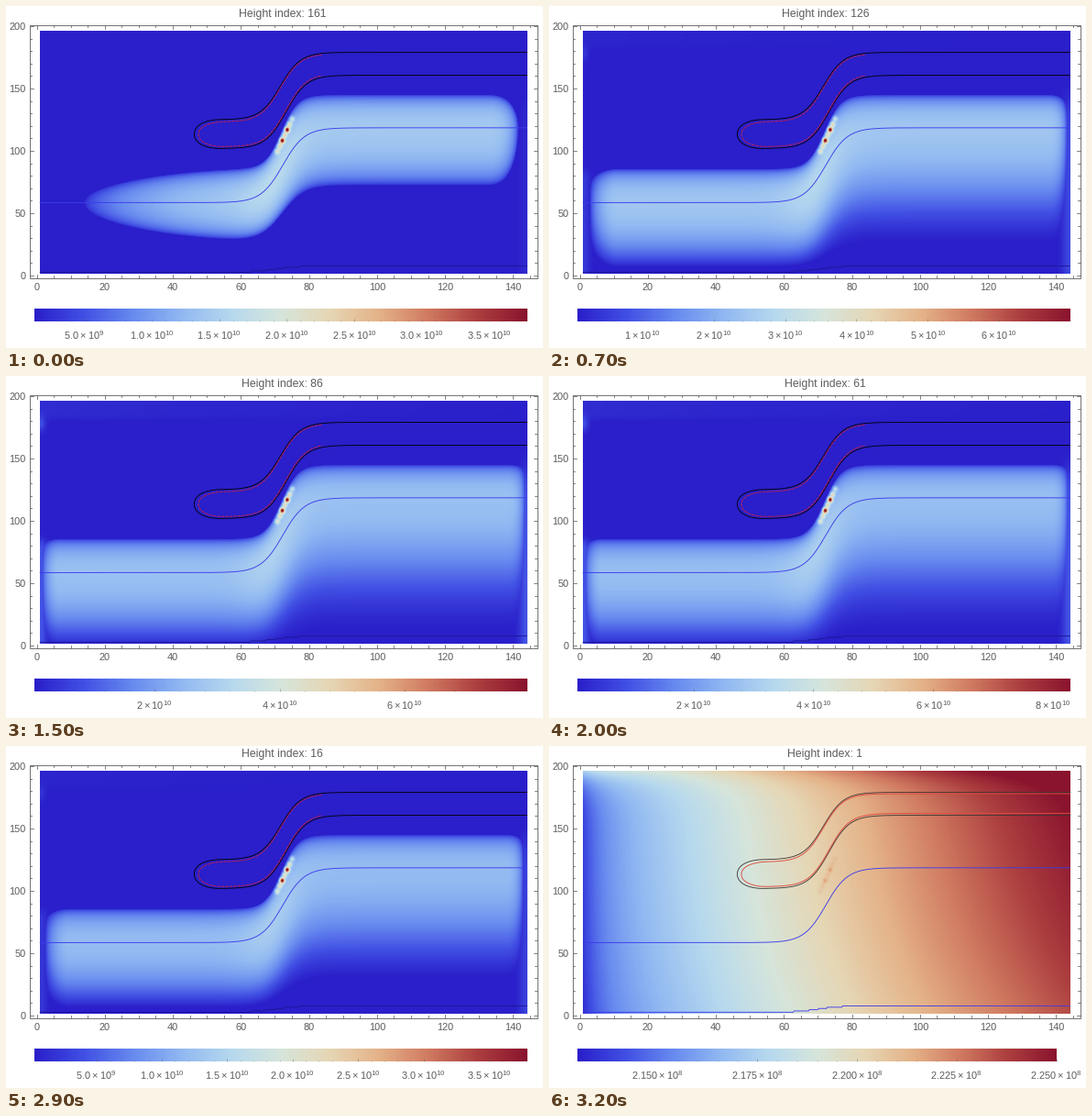
A matplotlib script for the animation above (3.3 s loop, 586x373 px).

```python
import math

import numpy as np
import matplotlib.pyplot as plt
from matplotlib.animation import FuncAnimation
from matplotlib.colors import LinearSegmentedColormap
from matplotlib.patches import Rectangle

W, H, DPI = 586, 373, 64
FRAMES, INTERVAL = 33, 100
PX = 72 / DPI  # points per pixel
GREY = "#666666"
LEFT, RIGHT, TOP, BOTTOM = 37, 568, 27, 291  # density area
FRAME_L, FRAME_R, FRAME_T, FRAME_B = 25, 579, 20, 296
BAR_T, BAR_B = 329.5, 343.5

plt.rcParams.update({
    "font.family": "Liberation Sans",
    "mathtext.fontset": "custom",
    "mathtext.rm": "Liberation Sans",
})

STOPS = [(42, 31, 202), (65, 80, 228), (104, 139, 239), (146, 185, 242),
         (182, 217, 238), (214, 229, 219), (230, 214, 180), (228, 178, 136),
         (208, 122, 97), (172, 62, 63), (138, 20, 46)]
THERMO = LinearSegmentedColormap.from_list(
    "thermo", [tuple(c / 255 for c in s) for s in STOPS], N=512)


def px_x(x):
    return 33 + 3.714 * x


def px_y(y):
    return 293.5 - 1.36 * y


def rise(x, mid, width):
    return (1 + np.tanh((x - mid) / width)) / 2


# Profile parameters by height index
KEYS = [1, 16, 31, 111, 141, 161]
PROFILE = {
    "depth_l": [46, 52, 60, 60, 43, 30],
    "depth_r": [82, 90, 115, 115, 74, 46],
    "pow_l": [0.9, 1.0, 1.05, 1.05, 0.7, 0.5],
    "pow_r": [1.4, 1.5, 2.3, 2.3, 1.0, 0.5],
    "start": [3, 2.5, 1.5, 1.5, 4.5, 14],
    "ramp": [7, 7, 5, 5, 11, 50],
    "end": [143, 143, 143.5, 143.5, 143, 141.5],
    "fade": [6, 6, 6, 6, 7, 10],
    "round": [0.3, 0.3, 0.2, 0.2, 0.6, 1],
    "strip_l": [0.03, 0.05, 0.11, 0.11, 0, 0],
    "strip_r": [0.04, 0.07, 0.11, 0.11, 0.06, 0.02],
    "peak": [0.31, 0.31, 0.31, 0.33, 0.35, 0.35],
}
RANGE_KEYS = [1, 16, 31, 61, 111, 141, 161]
LOW = [0.0213, 0.031, 0.07, 0.073, 0.1, 0.089, 0.133]
HIGH = [0.0225, 3.79, 9.84, 8.28, 7.63, 6.36, 3.78]

cols, rows = np.meshgrid(np.arange(LEFT, RIGHT + 1), np.arange(TOP, BOTTOM + 1))
gx, gy = (cols - 33) / 3.714, (293.5 - rows) / 1.36
step_x = rise(gx, 72.3, 6.4)
axis_y = 58.5 + 60 * step_x
edge_y = 85.5 + 59.5 * rise(gx, 71.9, 4.8)
delta = gy - axis_y

# Hot cells along the steep edge
hot = np.zeros_like(gx)
for i, amp in enumerate([0.28, 0.32, 0.8, 0.32, 0.8, 0.34, 0.22]):
    cx, cy = 295.5 + 2.7 * i, 158 - 5.9 * i
    hot += amp * np.exp(-((cols - cx) / 2.6) ** 2 - ((rows - cy) / 2.9) ** 2)


def plasma(n):
    p = {k: np.interp(n, KEYS, v) for k, v in PROFILE.items()}
    depth = p["depth_l"] + (p["depth_r"] - p["depth_l"]) * step_x
    power = p["pow_l"] + (p["pow_r"] - p["pow_l"]) * step_x
    above = delta > 0
    reach = np.where(above, np.maximum(edge_y - axis_y, 4), depth)
    power = np.where(above, 0.48, power)
    loss_l = (1 - np.clip((gx - p["start"]) / p["ramp"], 0, 1)) ** 1.7
    loss_r = (1 - np.clip((p["end"] - gx) / p["fade"], 0, 1)) ** 3
    left = np.clip(1 - loss_l - loss_r, 1e-6, 1)
    core = np.clip(1 - (delta / reach) ** 2 / left ** p["round"], 0, 1) ** power
    v = p["peak"] * core * np.sqrt(left)
    v *= 1 + 0.17 * np.exp(-((gx - 69) / 9) ** 2)
    strip = (p["strip_l"] * np.exp(-((gx - 1) / 2) ** 2) * rise(84 - gy, 0, 4)
             + p["strip_r"] * np.exp(-((144 - gx) / 2.2) ** 2)
             * rise(138 - gy, 0, 12))
    haze = p["strip_l"] * (0.25 * rise(gy, 182, 3) * np.exp(-gx / 90)
                           + 0.9 * np.exp(-((gx - 1) / 1.5) ** 2
                                          - ((gy - 178) / 6) ** 2))
    return np.maximum(v, strip) + haze + hot


def base_layer():
    dx = cols - LEFT
    u = dx / (RIGHT - LEFT)
    v = 0.155 + 0.00144 * cols - 0.14 * np.exp(-dx / 20)
    v += 0.035 * np.sin(np.pi * u) + 0.1 * u * (gy / 196 - 0.6)
    v -= 0.04 * (1 - gy / 196) ** 3
    v += (0.12 + 0.18 * np.exp(-dx / 60)) * np.exp(-(196 - gy) / 11)
    return v + 0.14 * hot


def loop(tip, top, bottom, nose=29):
    """Closed-nose channel between two rising branches, in pixels."""
    x = tip + (RIGHT - tip) * np.linspace(0, 1, 500) ** 3
    up = top[0] + (top[1] - top[0]) * rise(x, 299, 22)
    low = bottom[0] + (bottom[1] - bottom[0]) * rise(x, 305, 22.5)
    t = np.clip((tip + nose - x) / nose, 0, 1)
    half = (low - up) / 2 * (1 - t ** 2.2) ** (1 / 2.2)
    mid = (up + low) / 2
    return (np.concatenate([x[::-1], x]),
            np.concatenate([(mid - half)[::-1], mid + half]))


fig = plt.figure(figsize=(W / DPI, H / DPI), dpi=DPI, facecolor="white")
ax = fig.add_axes([0, 0, 1, 1])
ax.axis("off")


def fit_view():
    ax.set_xlim(-0.5, W - 0.5)
    ax.set_ylim(H - 0.5, -0.5)


def line(x, y, color=GREY, width=1.0, **kw):
    return ax.plot(x, y, color=color, lw=width * PX, **kw)[0]


def label(x, y, s, size=11, **kw):
    style = dict(ha="center", va="center", color="#5c5c5c")
    return ax.text(x, y, s, fontsize=size * PX, **{**style, **kw})


# Frame, ticks and tick labels
ax.add_patch(Rectangle((FRAME_L, FRAME_T), FRAME_R - FRAME_L, FRAME_B - FRAME_T,
                       fill=False, ec=GREY, lw=0.9 * PX))
for x in range(0, 146, 5):
    size = 4 if x % 20 == 0 else 2.5
    for edge, sign in ((FRAME_B, -1), (FRAME_T, 1)):
        line([px_x(x)] * 2, [edge, edge + sign * size], width=0.8)
    if x % 20 == 0:
        label(px_x(x), 307, str(x))
for y in range(0, 201, 10):
    size = 4 if y % 50 == 0 else 2.5
    for edge, sign in ((FRAME_L, 1), (FRAME_R, -1)):
        line([edge, edge + sign * size], [px_y(y)] * 2, width=0.8)
    if y % 50 == 0:
        label(21.5, px_y(y), str(y), ha="right", va="center_baseline")

image = ax.imshow(base_layer(), cmap=THERMO, vmin=0, vmax=1, aspect="auto",
                  interpolation="nearest", zorder=1,
                  extent=(LEFT - 0.5, RIGHT + 0.5, BOTTOM + 0.5, TOP - 0.5))
bar = ax.imshow(np.linspace(0, 1, 512)[None, :], cmap=THERMO, aspect="auto",
                interpolation="bilinear", extent=(30.5, 568.5, BAR_B, BAR_T))
fit_view()

# Contours
xs = np.linspace(1, 144, 573)
line(px_x(xs), px_y(58.5 + 60 * rise(xs, 72.3, 6.4)), "#3c3ceb", 0.9)
floor_line = line(px_x(xs), px_y(2.7 + np.round(5 * rise(xs, 70, 6.4))),
                  "#3c3ceb", 0.9)
outer = line(*loop(205, (123.5, 50), (155, 75)), "black", 0.85)
inner_x, inner_y = loop(209.5, (126, 51.5), (153, 73))
near = np.where(inner_x < 345, inner_y, np.nan)
inner = line(inner_x, near, "#c81e46", 0.9)

title = label(301, 8.6, "", 12.3)
scale_parts = []


def tick_step(span):
    k = 10.0 ** (math.floor(math.log10(span)) - 1)
    return next(s * k for s in (1, 2, 5, 10, 20, 50) if span / (s * k) <= 7.8)


def draw_scale(lo, hi, right, step, digits=None):
    while scale_parts:
        scale_parts.pop().remove()
    bar.set_extent((30.5, right + 0.5, BAR_B, BAR_T))
    fit_view()
    last = math.floor(hi / step + 1e-6) * step
    if digits is None:
        digits = (math.floor(math.log10(last) + 1e-9)
                  - math.floor(math.log10(step) + 1e-9))
    for i in range(math.ceil(5 * lo / step), math.floor(5 * hi / step + 1e-6) + 1):
        v = i * step / 5
        x = 31 + (right - 31) * (v - lo) / (hi - lo)
        major = i % 5 == 0
        scale_parts.append(line([x, x], [BAR_B - (3 if major else 1.5), BAR_B],
                                GREY, 0.7, alpha=0.6, solid_capstyle="butt"))
        if major:
            e = math.floor(math.log10(v) + 1e-9)
            s = rf"$\mathrm{{{v / 10 ** e:.{digits}f}}}\times 10^{{{e}}}$"
            scale_parts.append(label(x, 358.6, s))


def update(i):
    n = 161 - 5 * i
    title.set_text(f"Height index: {n}")
    lo = np.interp(n, RANGE_KEYS, LOW) * 1e10
    hi = np.interp(n, RANGE_KEYS, HIGH) * 1e10
    ground = n == 1
    image.set_data(base_layer() if ground else plasma(n))
    inner.set_ydata(inner_y if ground else near)
    inner.set_color("#e04a3c" if ground else "#c81e46")
    inner.set_linestyle("-" if ground else (0, (4, 1)))
    outer.set_color("#3a3434" if ground else "black")
    floor_line.set_color("#3c3ceb" if ground else "#1e1696")
    if ground:
        draw_scale(lo, hi, 553, 2.5e6, 3)
    else:
        draw_scale(lo, hi, 568, tick_step(hi - lo))
    return []


anim = FuncAnimation(fig, update, frames=FRAMES, interval=INTERVAL,
                     init_func=lambda: [], repeat=True, repeat_delay=0,
                     blit=False)
plt.show()
```
